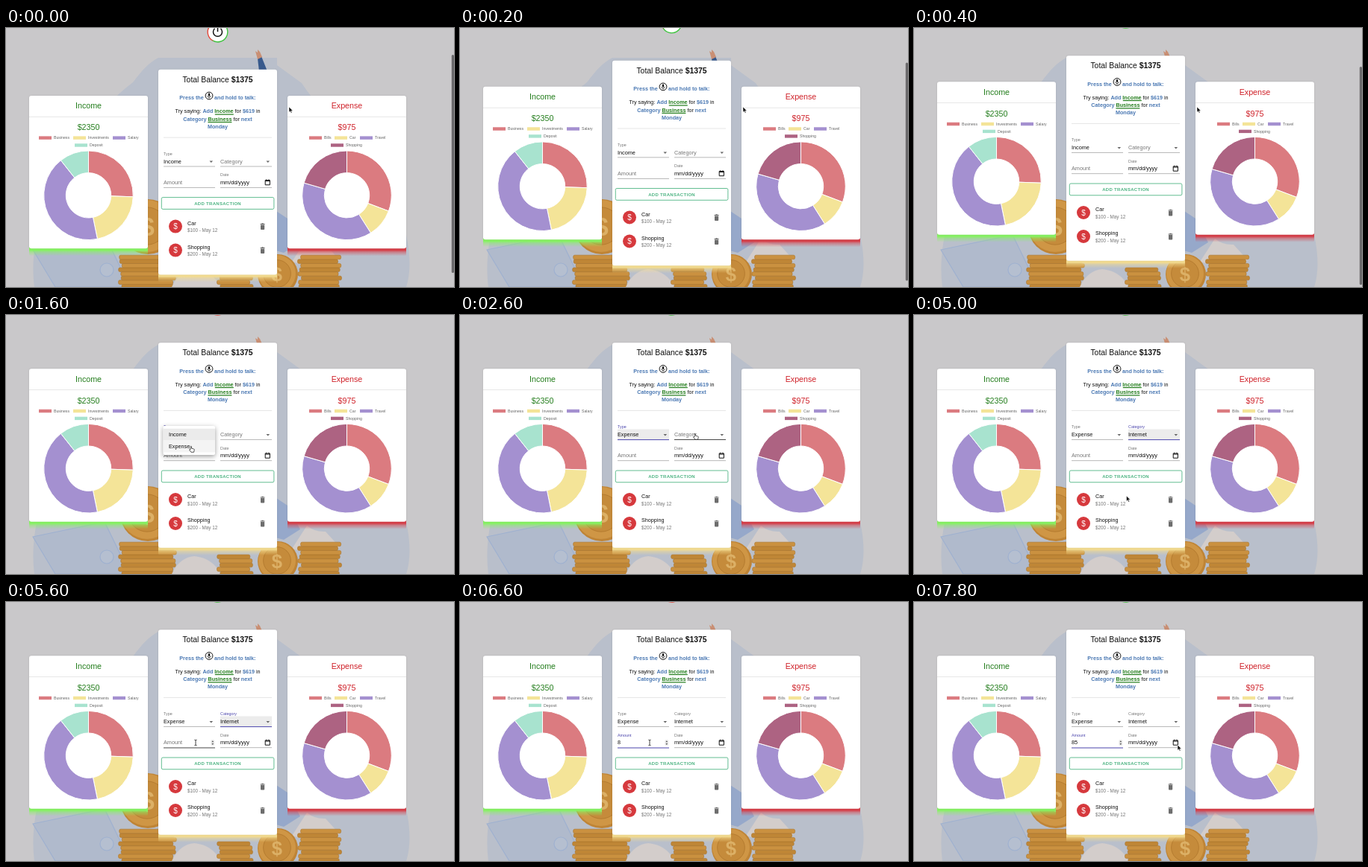
An HTML page for the animation above (8 s loop, 600 px wide and 348 px high).

```html
<!DOCTYPE html>
<html lang="en">
<head>
<meta charset="utf-8">
<title>Expense tracker</title>
<style>
  html, body { margin: 0; width: 100%; height: 100%; overflow: hidden; background: #c9c8ca; }
  svg { display: block; width: 100vw; height: 100vh; font-family: "Liberation Sans", Arial, sans-serif; }
  text { white-space: pre; }
  .shadow { filter: drop-shadow(0 0 1px rgba(0, 0, 0, .1)); }
  .menu { filter: drop-shadow(0 2px 3px rgba(0, 0, 0, .4)); }
</style>
</head>
<body>
<svg viewBox="0 0 600 348">
  <defs>
    <linearGradient id="ringColor" x2="0" y2="1">
      <stop offset=".42" stop-color="#e5483a"/><stop offset=".58" stop-color="#3fc43f"/>
    </linearGradient>
  </defs>
  <g id="backdrop"></g>
  <g id="page">
    <g id="power">
      <circle cx="283.5" cy="-13.2" r="13.2" fill="#fff"/>
      <circle id="ring" cx="283.5" cy="-13.2" r="13.3" fill="none" stroke="url(#ringColor)" stroke-width="1.4"/>
      <path d="M279.5 -17.8a6 6 0 1 0 8 0M283.5 -20.5v7" fill="none" stroke="#111" stroke-width="1.5"/>
    </g>
    <g id="cards"></g>
    <g id="form"></g>
  </g>
  <rect id="scrollbar" x="596.8" width="3.2" height="293" rx="1.5" fill="#6b6a6c"/>
  <g id="cursor"></g>
</svg>
<script>
const STEP = 200, LOOP = 8000, SCROLL = 18.6;
const GREEN = '#237d1c', RED = '#cf2129', BLUE = '#4a78b3', GRAY = '#777', FOCUS = '#4b45ac';
const ROSE = '#db7b80', YELLOW = '#f4e498', PURPLE = '#a490d0', MINT = '#a8e3cf', PLUM = '#ad6382';
const $ = id => document.getElementById(id);

const text = (x, y, size, str, fill = '#111', more = '') =>
  `<text x="${x}" y="${y}" font-size="${size}" fill="${fill}" ${more}>${str}</text>`;
const centered = (x, y, size, str, fill, more = '') =>
  text(x, y, size, str, fill, `text-anchor="middle" ${more}`);
const rect = (x, y, w, h, fill, more = '') =>
  `<rect x="${x}" y="${y}" width="${w}" height="${h}" fill="${fill}" ${more}/>`;
const path = (d, fill, more = '') => `<path d="${d}" fill="${fill}" ${more}/>`;
const circle = (x, y, r, fill, more = '') => `<circle cx="${x}" cy="${y}" r="${r}" fill="${fill}" ${more}/>`;
const bold = (str, fill = BLUE) => `<tspan font-weight="bold" fill="${fill}">${str}</tspan>`;

// Illustration behind the cards
function coinStack(x, top, w) {
  let out = '';
  for (let y = 350, i = 0; y > top; y -= 5.6, i++) {
    const left = x + 2.5 * Math.sin(i * 2.3 + x);
    out += rect(left, y - 5.6, w, 5.6, i % 2 ? '#ca9140' : '#bf8636', 'rx="2" stroke="#a9742a" stroke-width=".6"');
  }
  return out;
}
const coin = (x, y, r) =>
  circle(x, y, r, '#bf8435') + circle(x - 1, y - 1, r - 2, '#cf9645') +
  circle(x - 1, y - 1, r * .68, '#c58b3b', 'stroke="#b57c30" stroke-width="1"') +
  centered(x - 1, y + r * .32, r * .95, '$', '#dcb066', 'font-weight="bold"');

$('backdrop').innerHTML =
  rect(0, 0, 600, 348, '#c9c8ca') +
  path('M38 348C25 250 95 130 170 73C182 57 192 46 204 40H363V50L396 74C440 140 520 200 536 278Q545 320 536 348Z', '#b9bfcb') +
  path('M36 298L132 278L166 348H66Z', '#b0bacc', 'stroke="#9fb1d0" stroke-width="1.2"') +
  circle(135, 325, 9, '#b5bfd0', 'stroke="#9fb1d0" stroke-width="1.2"') +
  path('M339 58L337 41L342 38L350 58Z', '#37598c') +
  path('M337 42L334 31L337 33L337 29L340 32L343 39Z', '#c98f74') +
  path('M350 238L377 256L394 288L372 302L350 296Z', '#96a8ca') +
  coin(190, 267, 37) + coinStack(153, 306, 73) +
  path('M222 348Q232 326 252 324Q276 326 288 348Z', '#d3cdcb') +
  coinStack(285, 322, 44) +
  path('M383 314L403 283Q414 292 428 291L447 312L420 324Z', '#d3cdcb') +
  coinStack(393, 310, 54) + coin(364, 331, 27);

// Cards with a glowing bottom edge
function card(x, y, w, h, id, color, glow) {
  return `<linearGradient id="${id}" x2="0" y2="1"><stop offset=".4" stop-color="${color}"/>
    <stop offset=".6" stop-color="${color}" stop-opacity=".5"/><stop offset="1" stop-color="${color}" stop-opacity="0"/></linearGradient>` +
    rect(x, y + h - 3, w, glow + 3, `url(#${id})`, 'rx="2"') +
    rect(x, y, w, h, '#fff', 'rx="3" class="shadow"');
}

function donut(cx, slices) {
  const cy = 206.2, total = slices.reduce((sum, s) => sum + s[1], 0);
  const at = (r, a) => `${cx + r * Math.sin(a)} ${cy - r * Math.cos(a)}`;
  let from = 0;
  return slices.map(([, value, color]) => {
    const a = from, b = from += value / total * 2 * Math.PI, big = +(b - a > Math.PI);
    return path(`M${at(59.8, a)}A59.8 59.8 0 ${big} 1 ${at(59.8, b)}L${at(30.2, b)}A30.2 30.2 0 ${big} 0 ${at(30.2, a)}Z`,
      color, 'stroke="#fff" stroke-width="1"');
  }).join('');
}

// Slice: name, amount, color, legend x, legend row
function chartCard(x, id, title, color, glow, slices) {
  const mid = x + 79.5, sum = slices.reduce((s, v) => s + v[1], 0);
  return card(x, 72.3, 159, 205.4, id, glow, 10) +
    centered(mid, 89.8, 10.7, title, color) + rect(x, 100.3, 159, .7, '#ddd') +
    centered(mid, 118.6, 10.7, '$' + sum, color) +
    slices.map(([name, , fill, lx, row]) =>
      rect(lx, 126.8 + row * 9.9, 17, 4.4, fill) + text(lx + 20, 130.8 + row * 9.9, 5.2, name, '#666')).join('') +
    donut(mid, slices);
}

function listItem(y, name, detail) {
  return circle(227, y, 9, '#d6393d') + centered(227, y + 3.6, 10, '$', '#fff') +
    text(243, y - 1.8, 7.2, name) + text(243, y + 7.6, 6.3, detail, GRAY) +
    path(`M340.6 ${y - 3.6}h1.5l.6 -.7h1.8l.6 .7h1.5v1h-6zM341 ${y - 2}h5.2v5.5q0 .9 -.9 .9h-3.4q-.9 0 -.9 -.9z`, '#6d6d6d');
}

$('cards').innerHTML =
  chartCard(31, 'glowIn', 'Income', GREEN, '#86f262', [
    ['Business', 600, ROSE, 44, 0], ['Investments', 500, YELLOW, 90, 0],
    ['Salary', 1000, PURPLE, 143, 0], ['Deposit', 250, MINT, 92, 1]]) +
  chartCard(377, 'glowOut', 'Expense', RED, '#d63f49', [
    ['Bills', 300, ROSE, 406, 0], ['Car', 100, YELLOW, 440, 0],
    ['Travel', 375, PURPLE, 474, 0], ['Shopping', 200, PLUM, 435, 1]]) +
  card(204, 37.2, 159, 275.6, 'glowMain', '#f3dc90', 10) +
  centered(283.5, 54.3, 10.4, 'Total Balance ' + bold('$1375', '#111')) +
  text(232.3, 77.6, 7.2, bold('Press the')) + text(279, 77.6, 7.2, bold('and hold to talk:')) +
  circle(272, 72.4, 4.9, '#fff', 'stroke="#111" stroke-width="1"') +
  rect(270.9, 69, 2.2, 4.2, '#111', 'rx="1.1"') +
  path('M269.7 72.3a2.3 2.3 0 0 0 4.6 0M272 74.6v1.4', 'none', 'stroke="#111" stroke-width=".7"') +
  centered(283.5, 95.6, 7.2, `Try saying: ${bold('Add')} ${bold('Income', GREEN)} for ${bold('$619')} in`) +
  centered(283.5, 106, 7.2, `${bold('Category')} ${bold('Business', GREEN)} for ${bold('next')}`) +
  centered(283.5, 116.2, 7.2, bold('Monday')) +
  rect(279.8, 96.9, 25, 1.2, GREEN) + rect(270.4, 107.3, 32, 1.2, GREEN) +
  rect(211, 128.2, 145, .6, '#d5d5d5') +
  rect(208.3, 209, 150.6, 15.8, '#fff', 'rx="1.8" stroke="#62bd91" stroke-width="1"') +
  centered(283.6, 219.2, 6, 'ADD TRANSACTION', '#4bb381', 'font-weight="bold" letter-spacing=".3"') +
  listItem(248, 'Car', '$100 - May 12') + listItem(280, 'Shopping', '$200 - May 12');

// Form fields: state is '', 'hover' or 'focus'
function field(x, y, label, value, state, isSelect) {
  const focused = state == 'focus';
  const line = focused ? [1, FOCUS] : state ? [.9, '#333'] : [.6, '#8a8a8a'];
  return (focused && isSelect ? rect(x, y - 9.5, 69, 14, '#ececec') : '') +
    (value || focused ? text(x, y - 10.8, 5.4, label, focused ? FOCUS : GRAY) : text(x, y, 7.3, label, GRAY)) +
    text(x, y, 7.3, value) + rect(x, y + 4.1, 69, line[0], line[1]) +
    (isSelect ? path(`M${x + 61.5} ${y - 3}h4.6l-2.3 2.4z`, '#666') : '');
}

function menu(x, y, items, hovered, selected) {
  const row = 15.86, color = i => i == selected ? '#ebebeb' : i == hovered ? '#f4f4f4' : '#fff';
  return rect(x, y, 69.5, items.length * row + 7.4, '#fff', 'rx="2" class="menu"') +
    items.map((item, i) => rect(x, y + 3.7 + i * row, 69.5, row, color(i)) +
      text(x + 7.4, y + 14.2 + i * row, 7.3, item)).join('');
}

const categories = ['Bills', 'Car', 'Clothes', 'Travel', 'Food', 'Shopping', 'House',
  'Entertainment', 'Phone', 'Internet', 'Pets', 'Others'];

function form(n, pointerY) {
  const within = (a, b) => n >= a && n < b;
  const typeOpen = within(6, 11), categoryOpen = within(15, 23), typing = n >= 29;
  const typeState = within(6, 14) ? 'focus' : n == 5 ? 'hover' : '';
  const categoryState = within(15, 29) ? 'focus' : within(12, 15) ? 'hover' : '';
  const amountState = typing ? 'focus' : n >= 27 ? 'hover' : '';
  const amount = n >= 34 ? '85' : n >= 32 ? '8' : '';
  return field(211, 163, 'Type', n < 11 ? 'Income' : 'Expense', typeState, true) +
    field(287, 163, 'Category', n < 23 ? '' : 'Internet', categoryState, true) +
    field(211, 191.4, 'Amount', amount, amountState) +
    field(287, 191.4, 'Date', 'mm/dd/yyyy', '') +
    path('M347.2 186h6.2v6.2h-6.2zM347.2 187h6.2M348.6 186v-1.2M352 186v-1.2', 'none', 'stroke="#111" stroke-width="1"') +
    (amountState ? rect(274.3, 185, 5, 8, '#ececec', 'rx="1.5"') +
      path('M275.4 188.2l1.4 -1.9l1.4 1.9zM275.4 190l1.4 1.9l1.4 -1.9z', '#555') : '') +
    (typing && !amount && n % 5 < 3 ? rect(211, 185.5, .6, 7.5, '#111') : '') +
    (typeOpen ? menu(210.5, 149, ['Income', 'Expense'], pointerY > 168 ? 1 : 0, 0) : '') +
    (categoryOpen ? menu(287, 143, categories, Math.floor((pointerY - 146.7) / 15.86)) : '');
}

const cursors = {
  arrow: path('M0 0V7.2L1.7 5.7L2.8 8.2L4 7.7L2.9 5.2H5.2Z', '#111', 'stroke="#fff" stroke-width=".5"'),
  hand: path('M0 .8Q.8 -.4 1.5 .8V3.2L4.6 4Q5.4 4.4 5.2 5.4L4.6 8.3H.9L-1.4 5.2Q-1.4 4 0 4.8Z', '#fff', 'stroke="#111" stroke-width=".7"'),
  beam: path('M-1.6 -3.8Q0 -3.8 0 -2.8Q0 -3.8 1.6 -3.8M0 -2.8V2.8M-1.6 3.8Q0 3.8 0 2.8Q0 3.8 1.6 3.8', 'none', 'stroke="#111" stroke-width=".8"')
};
// Step, x, y, shape from there on
const track = [
  [0, 379, 106, 'arrow'], [2, 379, 106, 'arrow'], [5, 252, 160, 'hand'], [6, 250, 162, 'hand'],
  [8, 247, 176, 'hand'], [10, 247, 176, 'hand'], [13, 314, 159, 'hand'], [15, 314, 160, 'hand'],
  [19, 316, 312, 'hand'], [20, 316, 311, 'hand'], [21, 314, 297, 'hand'], [23, 313, 296, 'arrow'],
  [27, 256, 190, 'beam'], [28, 254, 189, 'beam'], [36, 254, 189, 'arrow'], [39, 353, 192, 'arrow'], [40, 353, 192, 'arrow']
];

function pointer(n) {
  const i = track.findIndex(k => k[0] > n), [a, x, y, shape] = track[i - 1], [b, x2, y2] = track[i];
  const p = (n - a) / (b - a);
  return { x: x + (x2 - x) * p, y: y + (y2 - y) * p, shape };
}

let shown = -1;
const start = performance.now();
function draw() {
  const n = Math.floor((performance.now() - start) % LOOP / STEP);
  if (n != shown) {
    shown = n;
    const scrolled = [0, .65][n] ?? 1, { x, y, shape } = pointer(n);
    $('page').setAttribute('transform', `translate(0 ${SCROLL * (1 - scrolled)})`);
    $('ring').setAttribute('transform', `rotate(${(n - 2) * 30} 283.5 -13.2)`);
    $('scrollbar').setAttribute('y', 36 + 16 * scrolled);
    $('scrollbar').setAttribute('opacity', n < 7 ? 1 : 0);
    $('form').innerHTML = form(n, y);
    $('cursor').innerHTML = cursors[shape];
    $('cursor').setAttribute('transform', `translate(${x} ${y})`);
  }
  requestAnimationFrame(draw);
}
draw();
</script>
</body>
</html>
```
